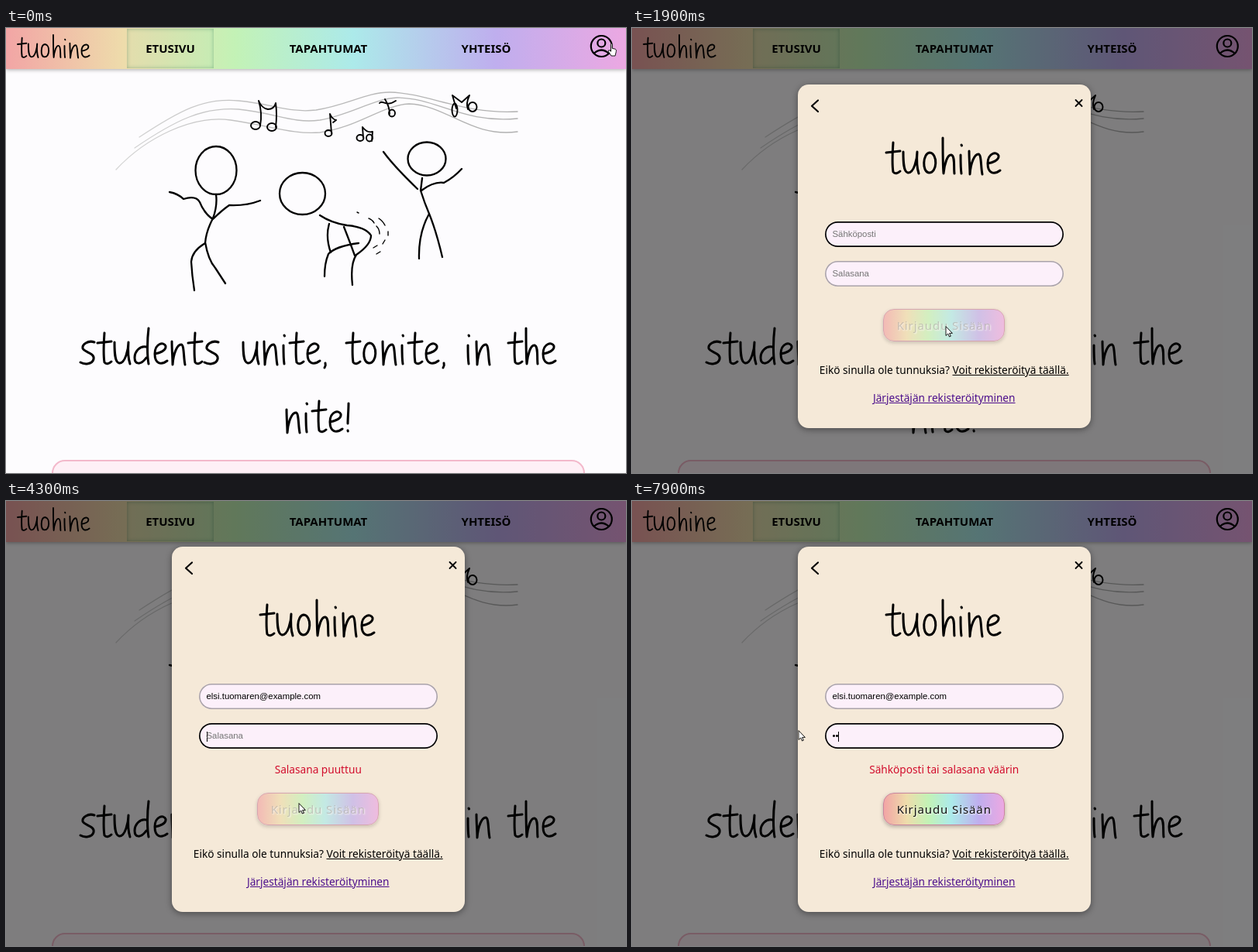
An HTML page for the animation above (8 s loop, 800 by 575 pixels).

```html
<!DOCTYPE html>
<html lang="fi">
<head>
<meta charset="utf-8">
<title>Kirjautuminen</title>
<style>
:root { --rainbow: linear-gradient(90deg, #f2a5a5, #eedcab 19%, #c3f2b6 37%, #aceaea 56%, #bfaeee 79%, #eca8e2); }
html, body { margin: 0; width: 100%; height: 100%; overflow: hidden; }
body { position: relative; background: #fdfcfe; color: #000; font-family: "Noto Sans", sans-serif; }
svg { position: absolute; left: 0; top: 0; overflow: visible; fill: none; stroke: #000; stroke-linecap: round; stroke-linejoin: round; }
#stage { position: absolute; width: 800px; height: 575px; overflow: hidden; }
header { position: absolute; width: 800px; height: 53px; background: var(--rainbow); box-shadow: 0 1px 5px #0005; }
header b { position: absolute; top: 0; width: 140px; text-align: center; font-size: 15px; line-height: 52px; }
#active { position: absolute; left: 156px; top: 1px; width: 112px; height: 51px; background: #a9dcb024; box-shadow: inset 0 0 5px #2a705066; }
#card { position: absolute; left: 59px; top: 558px; width: 684px; height: 60px; border: 2px solid #f3b9cb; border-radius: 17px; background: #fef0f6; }
#shade { position: absolute; inset: 0; background: #00000080; }
#modal { position: absolute; left: 214px; width: 377.5px; padding-bottom: 29px; border-radius: 14px; background: #f5e9d8; box-shadow: 0 2px 8px #0006; font-size: 13.67px; text-align: center; }
.field { box-sizing: border-box; position: relative; width: 308px; height: 33px; margin: 18px 0 0 34.5px; padding-left: 10px; border-radius: 17px; background: #fcf0fa; box-shadow: inset 0 0 0 1.6px #aaa3a9; font: 11.38px/32px "Liberation Sans", Arial, sans-serif; text-align: left; white-space: nowrap; }
.field.focus { box-shadow: inset 0 0 0 1.7px #000; }
.field i { display: inline-block; width: 1px; height: 13px; margin-right: -1px; background: #000; vertical-align: middle; }
.field small { font-size: inherit; color: #757575; }
.selected { background: #3390ff; color: #fff; }
#email { margin-top: 177px; }
.error { height: 27px; line-height: 27px; position: relative; top: 13px; color: #d20c2c; }
#submit { box-sizing: border-box; width: 157px; height: 42px; margin: 29.5px auto 0; border: 1px solid #c9869f; border-radius: 14px; background: var(--rainbow); box-shadow: 0 2px 5px #0004; font-size: 15px; font-weight: 500; line-height: 41px; letter-spacing: .9px; white-space: nowrap; color: #111; text-shadow: 1px 1px 2px #fff; }
#submit.off { opacity: .68; color: #77777780; }
p { margin: 27px 0 0; line-height: 20px; white-space: nowrap; }
p + p { margin-top: 16px; }
.organiser { color: #4c0f8c; }
[hidden] { display: none; }
</style>
</head>
<body>
<div id="stage">
  <svg width="800" height="575" stroke-width="2.300">
    <defs><linearGradient id="staff" gradientUnits="userSpaceOnUse" x1="140" x2="660" y1="0" y2="0">
      <stop stop-color="#d6d6d6"/><stop offset=".4" stop-color="#bdbdbd"/><stop offset="1" stop-color="#b0b0b0"/>
    </linearGradient></defs>
    <g stroke="url(#staff)" stroke-width="1.3">
      <path d="M172 141C225 106 255 90 300 94C345 98 365 110 400 106C440 100 465 83 495 83C545 84 590 112 660 108"/>
      <path d="M166 155C220 118 255 102 300 105C345 109 370 124 405 119C445 112 475 91 505 90C555 90 590 124 660 117"/>
      <path d="M142 183C180 142 240 112 290 119C340 126 370 138 405 135C455 128 485 100 520 98C570 100 600 142 660 134"/>
    </g>
    <g stroke-width="1.9">
      <ellipse cx="322" cy="126" rx="6" ry="5"/><ellipse cx="343" cy="128" rx="6" ry="5"/>
      <path d="M328 126Q331 110 326 94Q330 104 338 105Q346 105 348 97Q350 112 348 128"/>
      <ellipse cx="416" cy="136" rx="4.5" ry="4"/><path d="M420 136L418 111Q421 118 426 119L422 122"/>
      <ellipse cx="457" cy="142" rx="4.5" ry="4"/><ellipse cx="469" cy="142" rx="4" ry="4.5"/>
      <path d="M461 142L460 128Q466 136 473 134L472 146"/>
      <path d="M482 97C486 92 490 103 503 94M489 92Q495 102 495 111"/><ellipse cx="498" cy="110" rx="4" ry="4.5"/>
      <ellipse cx="579" cy="106" rx="3.5" ry="8.5"/><path d="M576 87L581 104M576 87L588 96L598 87Q593 98 596 105"/><ellipse cx="602" cy="102" rx="5.5" ry="6"/>
    </g>
    <ellipse cx="271" cy="184" rx="26.5" ry="31"/>
    <path d="M271 215Q273 230 267 246Q258 263 257 278Q240 288 239 302Q240 320 243 339M257 277Q261 300 270 310L283 330M211 212Q222 214 229 221Q245 216 250 225Q256 240 267 247Q278 236 288 229Q310 230 328 223"/>
    <ellipse cx="382.500" cy="214" rx="29.500" ry="27"/>
    <path d="M405 242Q420 252 440 255Q464 257 471 268Q471 280 452 293Q444 305 447 332M417 253Q412 270 419 290M436 257Q442 272 450 294M455 278Q425 282 416 292Q411 304 411 321"/>
    <path stroke-width="1.4" d="M453 238l2 1M468 246q5 2 7 6M478 256q4 4 4 10M481 246q5 3 8 9M493 263v5M489 274l-3 5M479 281l-5 3M483 289l-5 3"/>
    <ellipse cx="543" cy="169" rx="24.500" ry="21.500"/>
    <path d="M537 194L535 210Q540 226 546 240Q532 265 533 298M546 240Q555 262 563 296M487 160Q500 178 531 208M536 210Q552 198 565 200Q578 193 588 182"/>
  </svg>
  <svg class="ink" data-words="students,95,434|unite',304,434|tonite',439,434|in,592,434|the,648,434|nite!,359,522" role="img" aria-label="students unite, tonite, in the nite!"></svg>
  <div id="card"></div>
  <header>
    <div id="active"></div>
    <svg class="ink" data-words="tuohine,15,38,.63" role="img" aria-label="tuohine"></svg>
    <b style="left:142px">ETUSIVU</b><b style="left:346px">TAPAHTUMAT</b><b style="left:549.5px">YHTEISÖ</b>
    <svg stroke-width="2.200"><circle cx="768.3" cy="23.5" r="13.5"/><circle cx="768.3" cy="19.5" r="5"/><path d="M759 32.5Q768 24.500 777.500 32.500"/></svg>
  </header>
  <div id="shade">
    <div id="modal">
      <svg stroke-width="2.200"><path d="M26 20.500L18 27.700L26 35"/><path stroke-width="1.8" d="M358.500 20l8 8m0-8l-8 8"/></svg>
      <svg class="ink" data-words="tuohine,114,115" role="img" aria-label="tuohine"></svg>
      <div style="height:.1px"></div>
      <div class="field" id="email"></div>
      <div class="error" id="emailError">Sähköposti puuttuu</div>
      <div class="field" id="pass"></div>
      <div class="error" id="passError"></div>
      <div id="submit">Kirjaudu Sisään</div>
      <p>Eikö sinulla ole tunnuksia? <u>Voit rekisteröityä täällä.</u></p>
      <p><u class="organiser">Järjestäjän rekisteröityminen</u></p>
    </div>
  </div>
  <svg id="cursor" stroke-width=".9">
    <path id="arrow" fill="#fff" d="M0 0V11.500L2.700 9L4.500 13L6.300 12.200L4.600 8.400H8Z"/>
    <path id="hand" fill="#fff" d="M3.300 1.300C3.300-.2 5.200-.2 5.200 1.300V6.300L9.200 7.200Q10.800 7.700 10.300 10.500L9 16H4L.4 10.500Q-.2 8.300 1.700 8.800L3.300 10Z"/>
    <path id="beam" d="M-2.500-5.500Q0-5.500 0-4.500Q0-5.500 2.500-5.500M0-4.500V4.500M-2.500 5.500Q0 5.500 0 4.500Q0 5.500 2.500 5.500"/>
  </svg>
</div>
<script>
const $ = id => document.getElementById(id);

// Handwritten letters: advance width and pen path, baseline at 0
const GLYPHS = {
  s: [23, "M19-28C11-31 3-25 4-20C6-15 20-14 18-6C16 1 6 1 1-2"],
  t: [20, "M9-40C8-25 8-8 9-2C11 1 15 0 18-3M0-27L18-29"],
  u: [26, "M2-28C2-16 2-2 8-1C16 0 20-20 20-28C19-15 20-6 22 0"],
  d: [25, "M17-22C9-24 2-16 2-8C2 1 10 2 17-8M20-46C18-30 18-10 20 0"],
  e: [22, "M3-13C9-14 18-17 17-23C15-29 3-27 3-13C3 0 11 2 19-4"],
  n: [24, "M3-29C3-18 4-8 4 1C5-14 10-25 15-25C19-25 18-8 20 1"],
  i: [12, "M4-24C4-15 4-6 5 0M5-37L5.5-36"],
  o: [24, "M10-27C1-26 0-2 9-1C20 0 21-26 10-27Z"],
  h: [22, "M3-46C3-30 3-12 4 0C5-12 9-25 14-24C19-23 17-8 18 0"],
  "'": [8, "M4-1Q5 2 3 5"],
  "!": [8, "M5-37C5-28 4-18 4-11M4-2L4.2-1"]
};

for (const svg of document.querySelectorAll(".ink")) {
  svg.setAttribute("stroke-width", 3);
  svg.innerHTML = svg.dataset.words.split("|").map(entry => {
    const [word, x, y, scale = 1] = entry.split(",");
    let pen = 0;
    const letters = [...word].map(c => {
      const [width, d] = GLYPHS[c];
      const path = `<path transform="translate(${pen})" d="${d}"/>`;
      pen += width;
      return path;
    });
    return `<g transform="translate(${x} ${y}) scale(${scale})">${letters.join("")}</g>`;
  }).join("");
}

const LOOP = 8000;
const ADDRESS = "elsi.tuomaren@example.com";
const OPEN = 500, EMPTY_CLICK = 2000, TYPE_EMAIL = 2900, PASS_FOCUS = 4200,
      TYPE_PASS = 5000, LOGIN = 6700, REJECTED = 7000, RESELECT = 7400, RETYPE = 7600;

// Pointer stops: time, x, y
const STOPS = [
  [0, 777, 20], [200, 766, 24], [600, 766, 24], [1050, 478, 279], [1400, 478, 279],
  [1850, 405, 386], [2150, 405, 386], [2500, 449, 256], [3700, 449, 256],
  [4150, 378, 391], [4500, 378, 391], [5000, 357, 295], [6100, 357, 295],
  [6600, 443, 386], [7050, 443, 386], [7350, 300, 304], [7420, 300, 304],
  [7600, 215, 297], [LOOP, 215, 297]
];
const CARET_RESETS = [1100, 2000, 2500, 3600, 4200, 6000, 7400, 7800];

function pointer(t) {
  const k = Math.max(1, STOPS.findIndex(stop => stop[0] > t));
  const [t0, x0, y0] = STOPS[k - 1], [t1, x1, y1] = STOPS[k];
  const p = (t - t0) / (t1 - t0), e = p * p * (3 - 2 * p);
  return [x0 + (x1 - x0) * e, y0 + (y1 - y0) * e];
}

const typed = (t, start, step, max) => Math.max(0, Math.min(max, Math.floor((t - start) / step)));

function drawField(id, value, label, focused, caretOn, selected) {
  const field = $(id);
  const caret = focused && caretOn && !selected ? "<i></i>" : "";
  const html = (value ? `<span class="${selected ? "selected" : ""}">${value}</span>` : "") + caret + (value ? "" : `<small>${label}</small>`);
  field.classList.toggle("focus", focused);
  if (field.innerHTML !== html) field.innerHTML = html;
}

function render(t) {
  const open = t >= OPEN;
  $("shade").hidden = !open;

  const email = ADDRESS.slice(0, typed(t, TYPE_EMAIL - 28, 28, ADDRESS.length));
  const dots = t < RETYPE ? typed(t, TYPE_PASS, 100, 10) : typed(t, RETYPE, 100, 2) || 10;
  const emailFocus = t >= 1100 && t < PASS_FOCUS;
  const passFocus = t >= PASS_FOCUS && t < LOGIN || t >= RESELECT;
  const selected = t >= 7450 && t < RETYPE + 100;
  const reset = CARET_RESETS.filter(at => at <= t).pop() || 0;
  const caretOn = (t - reset) % 1060 < 530;
  drawField("email", email, "Sähköposti", emailFocus, caretOn || t > TYPE_EMAIL && t < 3600);
  drawField("pass", "•".repeat(dots), "Salasana", passFocus, caretOn || t > TYPE_PASS && t < 6000, selected);

  const noEmail = t >= EMPTY_CLICK && !email;
  const noPass = t >= EMPTY_CLICK && !dots;
  const rejected = t >= REJECTED;
  $("emailError").hidden = !noEmail;
  $("passError").hidden = !noPass && !rejected;
  $("passError").textContent = rejected ? "Sähköposti tai salasana väärin" : "Salasana puuttuu";
  $("submit").classList.toggle("off", !email || !dots);
  const top = 72.5 - 13.5 * (noEmail + (noPass || rejected));
  $("modal").style.top = top + "px";

  const [x, y] = pointer(t);
  const overField = id => {
    const box = $(id).getBoundingClientRect();
    return x > box.left && x < box.right && y >= box.top && y <= box.bottom + 1;
  };
  const kind = t < 600 ? "hand" : overField("email") || overField("pass") ? "beam" : "arrow";
  for (const id of ["arrow", "hand", "beam"]) $(id).style.display = id === kind ? "" : "none";
  $("cursor").style.transform = `translate(${x}px, ${y}px)`;
}

const begin = performance.now();
function tick() {
  render((performance.now() - begin) % LOOP);
  requestAnimationFrame(tick);
}
tick();
</script>
</body>
</html>
```
